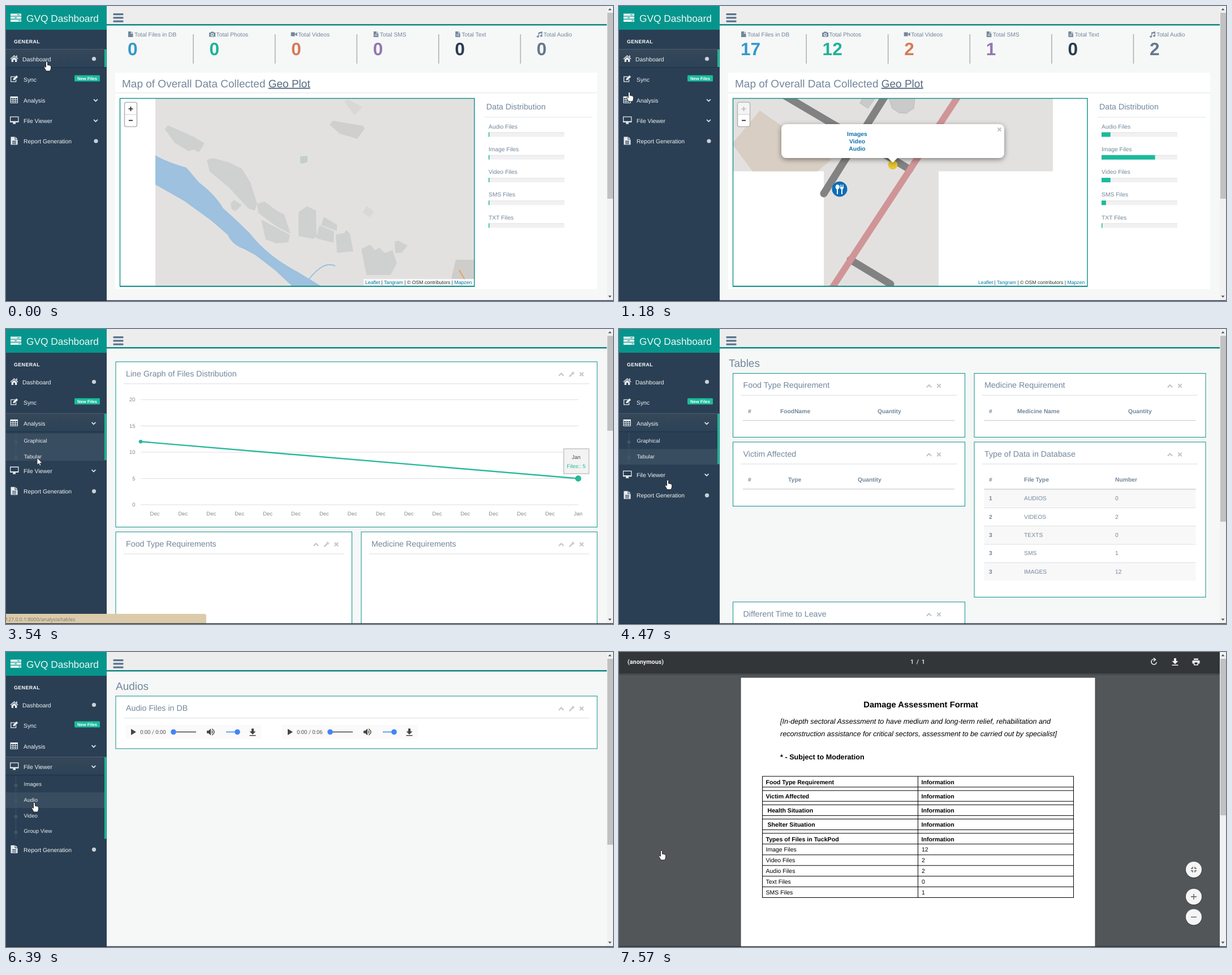
Write an HTML page that moves like this. It is 1073 px wide and 522 px high and loops after 8040 ms.

```html
<!DOCTYPE html>
<html lang="en">
<head>
<meta charset="utf-8">
<title>Dashboard tour</title>
<style>
html, body { margin: 0; width: 100%; height: 100%; overflow: hidden; background: #f7f7f7; }
svg { display: block; font-family: "Liberation Sans", Arial, sans-serif; text-rendering: geometricPrecision; }
text { white-space: pre; }
</style>
</head>
<body>
<svg id="stage" width="100%" height="100%" viewBox="0 0 1073 522"></svg>
<script>
const LOOP = 8040;
const TEAL = '#0b9088', GREEN = '#1abb9c', GREY = '#73879c', RULE = '#e6e9ed';
const ROW = 27.65;

// ---- markup helpers -------------------------------------------------
// y is the middle of the capitals
const text = (x, y, s, size = 10.35, fill = GREY, more = '') =>
  `<text x="${x}" y="${y + size * 0.355}" font-size="${size}" fill="${fill}" ${more}>${s}</text>`;
const BOLD = 'font-weight="bold"', MID = 'text-anchor="middle"';
const rect = (x, y, w, h, fill, more = '') =>
  `<rect x="${x}" y="${y}" width="${w}" height="${h}" fill="${fill}" ${more}/>`;
const circle = (x, y, r, fill, more = '') => `<circle cx="${x}" cy="${y}" r="${r}" fill="${fill}" ${more}/>`;
const path = (d, fill, more = '') => `<path d="${d}" fill="${fill}" ${more}/>`;
const stroke = (d, color, w, more = '') => path(d, 'none', `stroke="${color}" stroke-width="${w}" ${more}`);
const group = (id, body, more = '') => `<g id="${id}" ${more}>${body}</g>`;

const ICON = {
  file: 'M-4-5H1V-1H4.500V5H-4ZM2-5L4.500-2H2Z',
  doc: 'M-4-5H1V-1.500H4.500V5H-4ZM2-5L4.500-2.500H2ZM-2 .2H2.500V1H-2ZM-2 2.300H2.500V3.100H-2Z',
  camera: 'M-5.500-3H-3L-2-4.600H2L3-3H5.500V4.500H-5.500ZM0-2A2.800 2.800 0 1 0 .01-2ZM0-.7A1.500 1.500 0 1 1-.01-.7Z',
  video: 'M-5.500-3.500H1.500V3.500H-5.500ZM2-.8L5.500-3.500V3.500L2 .8Z',
  music: 'M-2-3L5-5V2.500A2 1.600 0 1 1 3.700 1.300V-2L-.8-.8V4A2 1.600 0 1 1-2 2.700Z',
  home: 'M0-6L7 .2 6 1.200 0-4-6 1.200-7 .2ZM3.500-5.500H5.200V-1L3.500-2.500ZM0-2.800L4.800 1.300V6H1.500V2.200H-1.500V6H-4.800V1.300Z',
  edit: 'M-6.500-4.500H2L.7-3.200H-5.200V4.200H2.500V1.800L3.800.5V5.500H-6.500ZM-2 2.300V-.3L4-6.200 6.700-3.600.6 2.300Z',
  table: 'M-7-6H6.500V6H-7ZM-5.800-3V-.9H-2.700V-3ZM-1.700-3V-.9H1.300V-3ZM2.300-3V-.9H5.400V-3ZM-5.800.1V2.100H-2.700V.1ZM-1.700.1V2.100H1.300V.1ZM2.300.1V2.100H5.400V.1ZM-5.800 3V4.900H-2.700V3ZM-1.700 3V4.900H1.300V3ZM2.300 3V4.900H5.400V3Z',
  desktop: 'M-7.500-6.500H8V4H2L3 6.700H-2.700L-1.700 4H-7.500ZM-6.200-5.200V1.800H6.700V-5.200Z',
  report: 'M-6-7H1V-2H6V7H-6ZM2-7L6-3H2ZM-3.500 0H3.500V1.200H-3.500ZM-3.500 2.300H3.500V3.500H-3.500ZM-3.500 4.600H3.500V5.700H-3.500Z',
  up: 'M-5 2L0-3 5 2 3.300 3.500 0 .3-3.300 3.500Z',
  down: 'M-4-1.300L-2.800-2.500 0 .2 2.800-2.500 4-1.300 0 2.700Z',
  close: 'M-4-2.500L-2.500-4 0-1.600 2.500-4 4-2.500 1.600 0 4 2.500 2.500 4 0 1.600-2.500 4-4 2.500-1.600 0Z',
  wrench: 'M-5 3.500L0-1.500Q0-5 4-4.800L2-2.800 3-1.700 5-3.500Q5.500.3 1.700.2L-3.300 5.200Z',
  load: 'M-2-6H2V-1H5.500L0 4.500-5.500-1H-2ZM-5.500 5.500H5.500V7H-5.500Z',
  print: 'M-4-6H4V-3.500H-4ZM-6.500-2.500H6.500V3H4V6H-4V3H-6.500ZM-2.500 1V4.600H2.500V1Z'
};
const icon = (name, x, y, fill = GREY) =>
  path(ICON[name], fill, `fill-rule="evenodd" transform="translate(${x} ${y})"`);

const panel = (x, y, w, h, title, tools, inset = 18) =>
  rect(x, y, w, h, '#fff', `stroke="${TEAL}"`) +
  text(x + inset, y + 20.500, title, 14.25) +
  rect(x + inset - 4, y + 38, w - 2 * inset + 8, 1.600, RULE) +
  tools.map(([name, tx]) => icon(name, tx, y + 22, '#c5c7cb')).join('');
const fullTools = x => [['up', x], ['wrench', x + 18.500], ['close', x + 36]];
const twoTools = x => [['up', x], ['close', x + 17.500]];

// ---- dashboard ------------------------------------------------------
const COUNTERS = [
  ['Total Files in DB', 17, '#3498cb', 'file'], ['Total Photos', 12, '#1fb299', 'camera'],
  ['Total Videos', 2, '#d67b58', 'video'], ['Total SMS', 1, '#9078b0', 'doc'],
  ['Total Text', 0, '#2a3b50', 'doc'], ['Total Audio', 2, '#65788d', 'music']];
const BARS = [['Audio', 2], ['Image', 12], ['Video', 2], ['SMS', 1], ['TXT', 0]];

function farMap() {
  const land = [
    'M281 218L286 211 313 223 333 232 351 243 341 259 331 254 323 257 298 242Z',
    'M355 272L366 269 395 277 417 288 432 312 444 350 440 362 428 358 395 322 360 293Z',
    'M403 343L417 352 406 363 399 360 397 350Z',
    'M444 350L457 346 480 363 492 369 503 403 478 390 446 366Z',
    'M451 378L502 405 499 418 478 420 459 413Z',
    'M517 365L532 354 548 362 549 408 543 412 517 407Z',
    'M562 373L585 387V398L557 388Z', 'M554 388L580 399 579 419 548 411Z',
    'M583 404L598 402 601 396 608 403 614 434 585 437Z',
    'M628 430L644 422 652 432 660 428 670 437 683 432 691 455 680 476H637Z',
    'M687 417L693 415 710 424 699 437H688Z'].join('');
  return rect(264, 164, 564, 331, '#e3e1e0') +
    path('M264 264Q284 276 319 286L341 312Q370 334 384 358L404 376 430 401Q463 443 515 470L556 495H505L475 467 441 441 421 430Q400 423 392 405L362 379 315 345 264 316Z', '#9dc1de') +
    stroke('M530 492Q540 475 555 464 568 454 582 460', '#9dc1de', 2) +
    path(land, '#ced1d0') +
    path('M598 169L605 165 630 179 616 193ZM630 365L638 354 651 364 643 374Z', '#d9d8d7') +
    path('M572 210L578 203 631 212 634 217 621 235 590 226Z', '#d0cfcd') +
    path('M520 266L533 265V276L524 279 520 278Z', '#c3d0c8') +
    path('M795 449H828V483H787Z', '#cfcdca') + stroke('M801 467L811 484', '#e2a25c', 2);
}

function nearMap() {
  const popup = path('M297 209H671Q681 209 681 219V259Q681 269 671 269H492L484 277 476 269H297Q287 269 287 259V219Q287 209 297 209Z', '#fff', 'filter="url(#soft)"');
  return rect(202, 164, 625, 331, '#fff') +
    rect(202, 164, 565, 128.500, '#e3e1e0') + rect(362, 292, 203, 203, '#e3e1e0') +
    path('M249 185L375 272 351 292.500H236L202 247V241Z', '#d8cec3') +
    path('M426 172L432 160H455L440 181ZM477 163H523L521 181 508 190 495 189 483 181Z', '#cacaca', 'stroke="#b9b9b9"') +
    stroke('M285 154L514 289M475 152L362 332M409 449L480 492', '#828282', 13, 'stroke-linecap="round"') +
    stroke('M602 156L374 503', '#d09596', 11.500) +
    circle(390, 324, 13.500, '#0a6cb8') +
    path('M386 316Q390 316 390 321 389 324 387 324.500V333H385V324.500Q383 324 382.500 321 383 316 386 316ZM391 316H392V320H393.500V316H394.500V320H396V316H397V322Q396 324 395 324.500V333H393V324.500Q391 324 391 322Z', '#fff') +
    circle(484, 281, 8.300, '#e9c62c') +
    group('popup', popup +
      ['Images', 'Video', 'Audio'].map((s, i) => text(421, 226.500 + 12.700 * i, s, 10.400, '#1374ab', `${BOLD} ${MID}`)).join('') +
      stroke('M669.500 215.500L675.500 221.500M675.500 215.500L669.500 221.500', '#c0c0c0', 1.800));
}

function dashboard() {
  const counters = COUNTERS.map(([label, , color, glyph], i) => {
    const x = 216 + 144.600 * i;
    return icon(glyph, x + 4, 50) + text(x + 11, 50, label, 10.300) +
      text(x - 1, 76, '0', 31.600, color, `${BOLD} id="count${i}"`) +
      (i ? rect(x - 30.300, 50, 1.600, 52, '#adb3b6') : '');
  }).join('');
  const bars = BARS.map(([label], i) => {
    const y = 213 + 40.250 * i;
    return text(853, y, label + ' Files') + rect(853, y + 10.500, 134, 8, '#f1f1f1') +
      rect(853, y + 10.500, 134, 1, '#e4e4e4') + rect(853, y + 10.500, 1.500, 8, GREEN, `id="bar${i}"`);
  }).join('');
  const credits = `<text x="635" y="492" font-size="8.7" fill="#333"><tspan fill="#0078a8">Leaflet</tspan> | <tspan fill="#0078a8">Tangram</tspan> | © OSM contributors | <tspan fill="#0078a8">Mapzen</tspan></text>`;
  return counters + rect(193, 118, 852, 383, '#fff') +
    text(205, 137, 'Map of Overall Data Collected <tspan text-decoration="underline" fill="#566a7f">Geo Plot</tspan>', 19) +
    rect(193, 153, 852, 1.300, RULE) +
    '<svg x="201" y="163" width="627" height="333" viewBox="201 163 627 333">' +
    rect(201, 163, 627, 333, '#fff') + group('far', farMap()) + group('near', nearMap()) +
    rect(632, 483, 196, 13, '#fff', 'opacity=".8"') + credits + '</svg>' +
    rect(201.500, 163.500, 626.500, 332.500, 'none', `stroke="${TEAL}" stroke-width="1.4"`) +
    rect(201, 495, 627, 2, TEAL) +
    rect(209.500, 170.500, 22, 43, '#fff', 'rx="3" stroke="#b4b4b4" stroke-width="1.6"') +
    rect(210.500, 171.500, 20, 20, '#f4f4f4', 'id="zoomOff"') + rect(210, 191.500, 21, 1, '#ccc') +
    stroke('M216.500 182H224.500M220.500 178V186', '#222', 1.700, 'id="plus"') +
    stroke('M217 202.500H224', '#222', 1.700) +
    text(849, 177.500, 'Data Distribution', 14.200) + rect(846, 196, 191, 1.300, RULE) + bars;
}

// ---- chart page -----------------------------------------------------
function chart() {
  let s = panel(194, 58, 851, 292.500, 'Line Graph of Files Distribution', fullTools(981.500));
  for (let i = 0; i < 5; i++) {
    const y = 125 + 46.500 * i;
    s += rect(238, y - 0.500, 774, 1, '#ddd') + text(228.500, y, 20 - 5 * i, 9.500, '#888', 'text-anchor="end"');
  }
  for (let i = 0; i < 16; i++) s += text(263 + 49.900 * i, 327, i < 15 ? 'Dec' : 'Jan', 9.500, '#888', MID);
  return s + stroke('M238 199.300L1011 264.500', '#26b99a', 2.400) +
    circle(238, 199.300, 3.200, '#26b99a') + circle(1011.500, 264.500, 5.400, '#26b99a') +
    rect(986, 212, 44.500, 44, '#f3f3f3', 'stroke="#ccc" stroke-width="1.8"') +
    text(1008, 227, 'Jan', 9.500, '#444d58', MID) + text(1008, 242.500, 'Files:: 5', 9.500, '#26b99a', MID) +
    panel(194, 359, 417.500, 180, 'Food Type Requirements', fullTools(548)) +
    panel(628, 359, 417, 180, 'Medicine Requirements', fullTools(981.500));
}

// ---- tables page ----------------------------------------------------
function tables() {
  const head = (x, y, cols) =>
    cols.map(([cx, s]) => text(cx, y, s, 10.300, GREY, BOLD)).join('') + rect(x, y + 16, 374, 1.600, '#d6d8da');
  let s = text(194, 60, 'Tables', 19) +
    panel(201.500, 78.500, 410, 113, 'Food Type Requirement', twoTools(548)) +
    head(219, 145, [[228, '#'], [285, 'FoodName'], [457, 'Quantity']]) +
    panel(628, 78.500, 409, 113, 'Medicine Requirement', twoTools(974)) +
    head(645.500, 145, [[654, '#'], [704, 'Medicine Name'], [900, 'Quantity']]) +
    panel(201.500, 200, 410, 113.500, 'Victim Affected', twoTools(548)) +
    head(219, 266.500, [[228, '#'], [299, 'Type'], [422, 'Quantity']]) +
    panel(628, 200, 409, 274.500, 'Type of Data in Database', twoTools(974));
  [[1, 'AUDIOS', 0], [2, 'VIDEOS', 2], [3, 'TEXTS', 0], [3, 'SMS', 1], [3, 'IMAGES', 12]].forEach(([n, kind, count], i) => {
    const y = 299.500 + 32.350 * i;
    s += rect(645.500, y - 16, 374, 32.350, i % 2 ? '#fff' : '#f8f8f8') + rect(645.500, y - 16, 374, 1, '#dcdee0') +
      text(654, y, n, 10.300, GREY, BOLD) + text(716, y, kind) + text(877, y, count);
  });
  return s + head(645.500, 266.500, [[654, '#'], [716, 'File Type'], [877, 'Number']]) +
    panel(201.500, 483, 410, 80, 'Different Time to Leave', twoTools(548));
}

// ---- audio page -----------------------------------------------------
function audios() {
  const player = (x, time) => `<g transform="translate(${x} 141.5)">` +
    rect(0, -12.500, 240, 25, '#fafafa') + path('M10-5.500L19 0 10 5.500Z', '#444') +
    text(26, 0, time, 9.600, '#555', 'font-family="Roboto, sans-serif"') +
    stroke('M85 0H125', '#444', 1.600) + circle(85, 0, 4.800, '#4285f4') +
    path('M144-2.300H147L151-6V6L147 2.300H144Z', '#444') +
    stroke('M152.500-2.500Q155 0 152.500 2.500M153-5.500Q161 0 153 5.500', '#444', 1.500) +
    stroke('M178 0H198', '#4285f4', 1.600) + circle(198, 0, 4.800, '#4285f4') + icon('load', 225, 0, '#444') + '</g>';
  return text(194, 60, 'Audios', 19) + panel(194, 78, 851, 93, 'Audio Files in DB', fullTools(981.500)) +
    player(211, '0:00 / 0:00') + player(488, '0:00 / 0:06');
}

// ---- PDF view -------------------------------------------------------
function pdf() {
  const sans = 'font-family="Roboto, sans-serif"';
  const black = (x, y, s, size, more) => text(x, y, s, size, '#000', more);
  const heads = ['Food Type Requirement', 'Victim Affected', 'Health Situation', 'Shelter Situation', 'Types of Files in TuckPod'];
  const rows = [['Image', 12], ['Video', 2], ['Audio', 2], ['Text', 0], ['SMS', 1]];
  let grid = 'M253.500 220V434.500M528.500 220V434.500M803.500 220V434.500';
  const line = y => { grid += `M253 ${y}H804`; };
  let s = rect(0, 0, 1062, 522, '#525659') + rect(0, 37, 1062, 4, '#454a4d') + rect(0, 0, 1062, 38, '#323639') +
    text(15, 17.500, '(anonymous)', 10.800, '#f1f1f1', `${BOLD} ${sans}`) +
    text(528, 17, '1 / 1', 10.800, '#f1f1f1', `${MID} ${sans} font-weight="500" word-spacing="2"`) +
    stroke('M948 13.300A4.700 4.700 0 1 0 950.300 18M945 10.500L948.500 13.500 945 16.500', '#f1f1f1', 1.500) +
    icon('load', 983, 17, '#f1f1f1') + icon('print', 1020, 17.500, '#f1f1f1') +
    rect(215, 45, 627, 477, '#fff', 'stroke="#414548"') +
    black(533.500, 93, 'Damage Assessment Format', 14.800, `${BOLD} ${MID}`) +
    black(285, 123, '[In-depth sectoral Assessment to have medium and long-term relief, rehabilitation and', 12.640, 'font-style="italic"') +
    black(285, 144.500, 'reconstruction assistance for critical sectors, assessment to be carried out by specialist]', 12.640, 'font-style="italic"') +
    black(285, 186, '* - Subject to Moderation', 12.640, BOLD);
  heads.forEach((h, i) => {
    const y = 230 + 25.200 * i;
    line(y - 10); line(y + 9);
    s += black(i == 2 || i == 3 ? 262.500 : 259.500, y, h, 10.600, BOLD) + black(534.500, y, 'Information', 10.600, BOLD);
  });
  rows.forEach(([kind, n], i) => {
    const y = 349.500 + 18.900 * i;
    line(y + 9.400);
    s += black(259.500, y, kind + ' Files', 10.500) + black(535, y, n, 10.500);
  });
  const button = (y, d) => circle(1016, y + 1, 14.500, '#3f4346') + circle(1016, y, 14, '#f5f5f5') +
    stroke(d, '#555', 1.300, `transform="translate(1016 ${y})"`);
  return s + stroke(grid, '#000', 1) +
    button(385, 'M-5-2H-2V-5M5-2H2V-5M-5 2H-2V5M5 2H2V5') + button(433, 'M-5 0H5M0-5V5') + button(469, 'M-5 0H5');
}

// ---- sidebar --------------------------------------------------------
const MENU = [
  ['Dashboard', 94, 'home'], ['Sync', 130, 'edit'], ['Analysis', 167, 'table', ['Graphical', 'Tabular']],
  ['File Viewer', 203, 'desktop', ['Images', 'Audio', 'Video', 'Group View']], ['Report Generation', 239.500, 'report']];

function sidebar() {
  const items = MENU.map(([label, y, glyph, subs], i) => {
    const mark = i == 1 ? rect(121, -7.500, 45, 11, GREEN, 'rx="1.5"') + text(143.500, -2, 'New Files', 7.600, '#fff', `${BOLD} ${MID}`)
      : group('mark' + i, subs ? icon('down', 155, 0, '#dfe5ea') : circle(155.500, -0.500, 3.600, '#c9d1d8'));
    const active = i == 1 || i == 4 ? '' : group('active' + i,
      rect(0, -18, 177, 32, 'url(#row)') + rect(0, -18, 177, 1, '#4b5e70') + rect(0, 14, 177, 1.500, '#22364a') +
      rect(174, -17, 3.500, 31, GREEN, `id="edge${i}"`));
    const list = subs ? `<svg id="sub${i}" x="0" y="17" width="178">` +
      subs.map((s, k) => rect(0, 0.700 + ROW * k, 174, ROW, '#fff', `id="hot${i}${k}" opacity=".07"`)).join('') +
      rect(17, 0, 1, ROW * subs.length, '#3d5367') +
      subs.map((s, k) => circle(17.500, 16 + ROW * k, 3, '#3f566b') + text(31.500, 14 + ROW * k, s, 9.600, '#e9edf0')).join('') + '</svg>' : '';
    return group('item' + i, active + list + icon(glyph, 14.500, -1, '#e7ebee') + text(i ? 31 : 29, 0, label, 10.350, '#f1f3f5') + mark);
  }).join('');
  return rect(0, 0, 178, 522, '#2a3f54') + rect(0, 0, 178, 42, '#06958c') +
    [14.500, 19.700, 25].map((y, i) => rect(8, y - 1, 19, 4, '#eefafa') + rect([20, 15, 22][i], y + 0.400, 4, 1.200, '#06958c')).join('') +
    text(36, 21.500, 'GVQ Dashboard', 17.300, '#eef8f8') +
    text(14, 63, 'GENERAL', 8.800, '#fff', `${BOLD} letter-spacing=".45"`) + items;
}

const stage = document.getElementById('stage');
stage.innerHTML = `<defs>
  <linearGradient id="row" x2="0" y2="1"><stop stop-color="#364859"/><stop offset="1" stop-color="#2c4257"/></linearGradient>
  <filter id="soft" x="-10%" y="-30%" width="120%" height="170%"><feDropShadow dx="0" dy="2.500" stdDeviation="5" flood-opacity=".45"/></filter></defs>` +
  rect(0, 0, 1073, 522, '#f6f7f7') +
  rect(178, 0, 884, 33, '#ededed') + rect(178, 32, 884, 2.500, '#0b867e') +
  [13, 19.300, 25.600].map(y => rect(189.500, y, 18, 3.200, '#5a738e', 'rx="1"')).join('') +
  group('page0', dashboard()) + group('page1', chart()) + group('page2', tables()) + group('page3', audios()) +
  group('side', sidebar()) + group('page4', pdf()) +
  group('status', path('M0 504H350Q354 504 354 508V522H0Z', '#dccbab') +
    text(-1, 513.500, '', 8.800, '#7a756c', 'id="statusText" font-family="Open Sans, sans-serif"')) +
  rect(1062, 0, 11, 522, '#f1f1f1') + path('M1064.500 7.500L1067.500 4 1070.500 7.500ZM1064.500 512.500H1070.500L1067.500 516Z', '#555') +
  rect(1063, 12, 10, 329, '#c1c1c1', 'id="thumb"') + rect(0, 520.700, 1073, 1.300, '#26303d') +
  group('cursor', path('M-1.500 1.300Q0-.8 1.500 1.300V6.500Q3 5.600 4 7 5.400 6.300 6.200 7.800 7.600 7.600 7.600 9.300V12Q7.300 14 6 17H-1Q-2.500 14-4.600 10.500-4.200 8.300-1.500 10.500Z', '#fff', 'id="hand" stroke="#111" stroke-width=".8"') +
    path('M0 0V12.500L3 9.800 5 14.200 7 13.300 5 9.200H9Z', '#fff', 'id="arrow" stroke="#222" stroke-width=".8"'));

const el = {};
stage.querySelectorAll('[id]').forEach(n => { el[n.id] = n; });
const set = (id, name, value) => el[id].setAttribute(name, value);
const show = (id, on) => set(id, 'display', on ? 'inline' : 'none');

// ---- timeline -------------------------------------------------------
const PATH = [
  [80, 72, 98], [320, 352, 290], [440, 352, 290], [870, 99, 150], [940, 99, 150], [1180, 18, 152], [1650, 18, 152],
  [1810, 50, 189], [1990, 58, 194], [2120, 150, 261], [2500, 150, 261], [2830, 55, 228], [3690, 55, 228],
  [4470, 86, 267], [4540, 86, 267], [4620, 86, 257], [5080, 86, 257], [5600, 49, 238], [5860, 49, 238],
  [6200, 50, 266], [6770, 50, 266], [7000, 52, 288], [7100, 52, 288], [7330, 75, 351]];
const ANALYSIS = [[1650, 0], [1810, 1], [3450, 1], [3540, 0.870], [3690, 0.870], [3850, 0], [4060, 0], [4060, 1], [5080, 1], [5330, 0]];
const VIEWER = [[5080, 0], [5400, 1]];
const HOST = '127.0.0.1:8000/', WAIT = 'Waiting for 127.0.0.1...';
const STATUS = [
  [1850, HOST + 'analysis/graphs'], [1930, WAIT], [2610, ''], [2980, HOST + 'analysis/tables'], [3770, WAIT], [4300, ''],
  [5860, HOST + 'filemanager/imageView'], [6040, HOST + 'filemanager/audioView'], [6240, WAIT], [6390, ''],
  [6850, HOST + 'filemanager/videoView'], [7170, HOST + 'report'], [7410, WAIT], [7490, '']];
const PAGES = [1990, 4060, 6390, 7490];
const THUMB = [329, 168, 329, 329, 277];

function along(keys, t, k = 1) {
  const i = keys.findIndex(key => key[0] > t);
  if (i == 0) return keys[0][k];
  if (i < 0) return keys[keys.length - 1][k];
  const a = keys[i - 1], b = keys[i];
  return a[k] + (b[k] - a[k]) * (t - a[0]) / (b[0] - a[0]);
}

function draw(t) {
  const page = PAGES.filter(p => t >= p).length;
  for (let i = 0; i < 5; i++) show('page' + i, i == page);
  show('side', page < 4);
  set('thumb', 'height', THUMB[page]);

  // counters, bars and map
  const grow = Math.min(1, Math.max(0, (t - 60) / 240));
  COUNTERS.forEach((c, i) => { el['count' + i].textContent = Math.round(c[1] * grow); });
  BARS.forEach((b, i) => set('bar' + i, 'width', Math.max(1.500, 134 * b[1] / 17 * grow)));
  const near = t >= 160;
  show('far', !near); show('near', near); show('zoomOff', near); show('popup', t >= 310);
  set('plus', 'stroke', near ? '#bbb' : '#222');

  // sidebar
  const x = along(PATH, t), y = along(PATH, t, 2);
  const open = { 2: along(ANALYSIS, t), 3: along(VIEWER, t) };
  const current = ['', '20', '21', '31', ''][page];
  let drop = 0;
  MENU.forEach(([, row, , subs], i) => {
    set('item' + i, 'transform', `translate(0 ${row + drop})`);
    const on = i == 0 ? page == 0 && !open[2] : open[i] > 0;
    if (el['active' + i]) show('active' + i, on);
    if (i != 1) set('mark' + i, 'transform', `translate(${page == 0 && !on ? 3.500 : 0} 0)`);
    if (!subs) return;
    const h = open[i] * subs.length * ROW;
    set('sub' + i, 'height', h + (h ? 1 : 0));
    set('edge' + i, 'height', 34 + h);
    subs.forEach((s, k) => {
      const top = row + drop + 17.700 + ROW * k;
      const hover = x < 174 && y >= top && y < Math.min(top + ROW, row + drop + 18 + h);
      show('hot' + i + k, hover || current == i + '' + k);
    });
    drop += h;
  });

  // status bubble and pointer
  const said = STATUS.filter(s => t >= s[0]).pop();
  show('status', said && said[1]);
  el.statusText.textContent = said ? said[1] : '';
  const arrow = (t > 160 && t < 860) || (t >= 3220 && t < 4200);
  show('arrow', arrow); show('hand', !arrow);
  set('cursor', 'transform', `translate(${x} ${y})`);
}

function tick() {
  draw(performance.now() % LOOP);
  requestAnimationFrame(tick);
}
tick();
</script>
</body>
</html>
```
